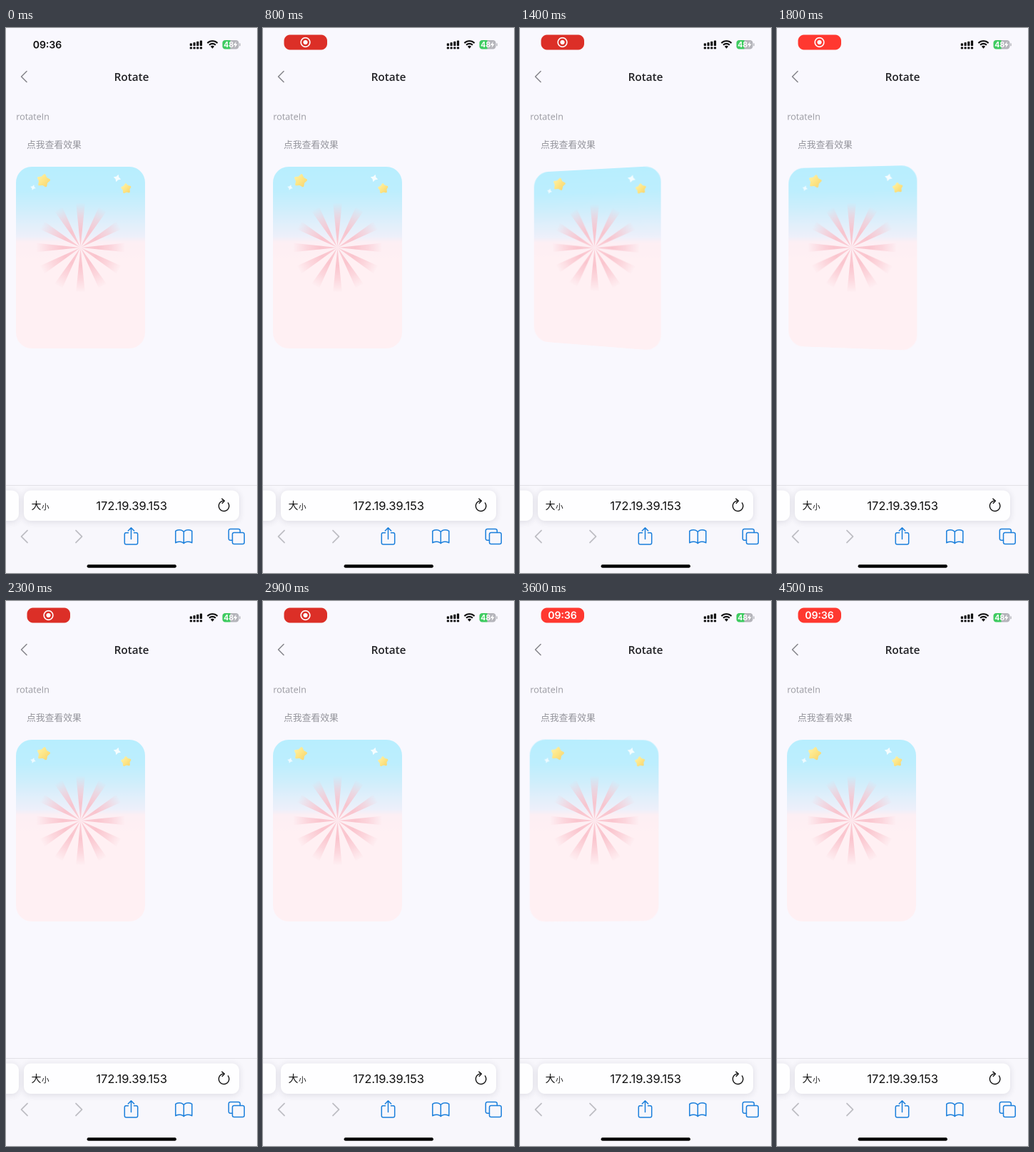
Recreate the animation shown at these times as an HTML page with a canvas. Size 352x762 px, loop 4700 ms.

```html
<!DOCTYPE html>
<html lang="zh">
<head>
<meta charset="utf-8">
<title>Rotate</title>
<style>
  html, body { margin: 0; width: 100%; height: 100%; overflow: hidden; background: #f9f8fe; }
  canvas { position: absolute; display: block; }
  #page { left: 0; top: 0; }
  #card { left: 14px; top: 194px; transform-origin: 90.5px 103px; }
</style>
</head>
<body>
<canvas id="page"></canvas>
<canvas id="card"></canvas>
<script>
const LOOP = 4700, TICK = 100, TURN = 1000, TAPS = [1020, 2930];
const BLUE = '#1a7fdc';
const UI = 'Inter, "Noto Sans CJK SC", sans-serif';
const TEXT = '"Open Sans", "Noto Sans", sans-serif';
const CJK = '"Noto Sans CJK SC", "Noto Sans CJK", sans-serif';

const cardEl = document.getElementById('card');
const page = setup(document.getElementById('page'), 352, 762);
const card = setup(cardEl, 181, 254);

function setup(el, w, h) {
  const k = Math.max(2, window.devicePixelRatio || 1);
  el.width = w * k;
  el.height = h * k;
  el.style.width = w + 'px';
  el.style.height = h + 'px';
  const c = el.getContext('2d');
  c.scale(k, k);
  return c;
}

function box(c, x, y, w, h, r, fill) {
  c.beginPath();
  c.roundRect(x, y, w, h, r);
  c.fillStyle = fill;
  c.fill();
}

function disc(c, x, y, r, fill) {
  c.beginPath();
  c.arc(x, y, r, 0, 7);
  c.fillStyle = fill;
  c.fill();
}

function line(d, color, width) {
  page.strokeStyle = color;
  page.lineWidth = width;
  page.lineCap = page.lineJoin = 'round';
  page.stroke(new Path2D(d));
}

function label(s, x, y, font, color, align = 'left') {
  page.font = font;
  page.fillStyle = color;
  page.textAlign = align;
  page.fillText(s, x, y);
}

// Easing
const clamp = v => Math.min(1, Math.max(0, v));
const mix = (a, b, t) => a + (b - a) * t;
const ramp = (t, a, b) => clamp((t - a) / (b - a));

function bezier(x1, y1, x2, y2) {
  const at = (a, b, u) => 3 * a * u * (1 - u) ** 2 + 3 * b * u * u * (1 - u) + u ** 3;
  return x => {
    let lo = 0, hi = 1;
    for (let i = 0; i < 24; i++) {
      const mid = (lo + hi) / 2;
      if (at(x1, x2, mid) < x) lo = mid; else hi = mid;
    }
    return at(y1, y2, lo);
  };
}
const easeIn = bezier(.42, 0, 1, 1), ease = bezier(.25, .1, .25, 1);

// Card artwork
function star(x, y, r, points, inner, tilt, fill, round) {
  card.beginPath();
  for (let i = 0; i < points * 2; i++) {
    const a = tilt - Math.PI / 2 + i * Math.PI / points, q = i % 2 ? r * inner : r;
    card.lineTo(x + q * Math.cos(a), y + q * Math.sin(a));
  }
  card.closePath();
  card.fillStyle = card.strokeStyle = fill;
  card.lineJoin = 'round';
  card.lineWidth = round;
  card.fill();
  if (round) card.stroke();
}

function goldStar(x, y, r, tilt) {
  const g = card.createLinearGradient(x - r, y - r, x + r, y + r);
  g.addColorStop(0, '#fff3a8');
  g.addColorStop(.55, '#fde483');
  g.addColorStop(1, '#f7d674');
  star(x, y, r, 5, .62, tilt, g, 3);
}

function drawCard() {
  const sky = card.createLinearGradient(0, 0, 0, 254);
  [[0, '#b8eefe'], [.13, '#bdeefe'], [.22, '#cdeefc'], [.31, '#e0effb'],
   [.385, '#eef0fa'], [.415, '#fdeff4'], [.5, '#fff0f3'], [1, '#fff0f3']]
    .forEach(([p, c]) => sky.addColorStop(p, c));
  box(card, 0, 0, 181, 254, 22, sky);

  const ray = card.createRadialGradient(90.5, 113, 0, 90.5, 113, 62);
  [[0, .35], [.12, .75], [.4, .85], [.7, .5], [1, .02]]
    .forEach(([p, a]) => ray.addColorStop(p, `rgba(250,190,200,${a})`));
  card.fillStyle = ray;
  for (let i = 0; i < 12; i++) {
    const a = i * Math.PI / 6;
    card.beginPath();
    card.moveTo(90.5, 113);
    for (const s of [-.1, .1]) card.lineTo(90.5 + 62 * Math.cos(a + s), 113 + 62 * Math.sin(a + s));
    card.fill();
  }

  goldStar(38.5, 19.5, 8, .2);
  goldStar(154.5, 30.5, 5.8, -.1);
  star(142, 16, 5.5, 4, .5, .3, 'rgba(255,255,255,.85)', 0);
  star(24, 29, 4, 4, .5, .3, 'rgba(255,255,255,.75)', 0);
}

// Damped flip around the vertical axis
const SWING = [[0, 90, easeIn], [.4, -20, easeIn], [.6, 10, ease], [.8, -5, ease], [1, 0]];

function angle(p) {
  for (let i = 0; i < 4; i++) {
    const [a, from, curve] = SWING[i], [b, to] = SWING[i + 1];
    if (p < b) return mix(from, to, curve((p - a) / (b - a)));
  }
  return 0;
}

function poseCard(t) {
  const tap = TAPS.find(s => t >= s && t < s + TURN);
  if (tap === undefined) {
    cardEl.style.transform = 'none';
    cardEl.style.opacity = 1;
    return;
  }
  const p = (t - tap) / TURN, deg = angle(p);
  const squash = p < .4 ? 1 - .34 * (deg + 20) / 110 : 1;
  cardEl.style.transform = `perspective(361px) rotateY(${deg}deg) translateY(24px) scaleY(${squash}) translateY(-24px)`;
  cardEl.style.opacity = Math.min(1, .6 + 1.4 * p);
}

// Status bar
function drawStatus(t) {
  const shown = ramp(t, 0, 400);
  const clock = ramp(t, 3100, 3300);
  const icon = ramp(t, 300, 800) * (1 - clock);
  const glow = ramp(t, 1400, 1700) * (1 - ramp(t, 1900, 2100)) + ramp(t, 3300, 3600);
  const font = '600 14px ' + UI;

  page.globalAlpha = 1 - shown;
  label('09:36', 58, 28.5, font, '#111', 'center');
  page.globalAlpha = shown;
  box(page, 29.5, 9.5, 60.5, 21, 8.5,
    `rgb(${mix(220, 255, glow)},${mix(47, 56, glow)},${mix(39, 48, glow)})`);
  page.globalAlpha = icon;
  page.strokeStyle = '#fff';
  page.lineWidth = 1.6;
  page.beginPath();
  page.arc(59.5, 20, 6.3, 0, 7);
  page.stroke();
  disc(page, 59.5, 20, 3.1, '#fff');
  page.globalAlpha = clock;
  label('09:36', 59.5, 25, font, '#fff', 'center');
  page.globalAlpha = 1;

  for (let i = 0; i < 4; i++) {
    const x = 257.8 + i * 4.7, h = 3.6 + i * 1.3;
    box(page, x, 25 - h, 3.2, h, .8, '#111');
    box(page, x, 26.4, 3.2, 3, .8, '#111');
  }

  page.lineCap = 'butt';
  page.strokeStyle = '#111';
  page.lineWidth = 2.1;
  for (const r of [10, 6.3]) {
    page.beginPath();
    page.arc(289.5, 28.2, r, -Math.PI * .75, -Math.PI * .25);
    page.stroke();
  }
  page.fillStyle = '#111';
  page.fill(new Path2D('M286.9 25.7Q289.5 23.6 292.1 25.7L289.5 28.8Z'));

  page.save();
  page.beginPath();
  page.roundRect(303.5, 17, 23, 12.5, 4);
  page.clip();
  page.fillStyle = '#b4b4ba';
  page.fillRect(303, 16, 24, 14);
  page.fillStyle = '#3ecb60';
  page.fillRect(303, 16, 11.5, 14);
  page.restore();
  box(page, 327.3, 21.3, 1.4, 4, .7, '#b4b4ba');
  label('48', 305.3, 27.2, '700 10.5px ' + UI, '#fff');
  page.fillStyle = '#fff';
  page.fill(new Path2D('M322.8 18.8L318.8 24H321.4L320.6 27.8L324.6 22.4H322Z'));
}

function drawBrowser() {
  page.fillStyle = '#f8f7fc';
  page.fillRect(0, 639, 352, 123);
  page.fillStyle = '#e2e1e7';
  page.fillRect(0, 639, 352, 1);

  page.save();
  page.shadowColor = 'rgba(40,40,60,.13)';
  page.shadowBlur = 18;
  page.shadowOffsetY = 3;
  box(page, -40, 646.5, 58, 42.5, 10, '#fefeff');
  box(page, 25, 646.5, 302, 42.5, 10, '#fefeff');
  page.restore();

  label('大', 35.5, 673, '500 14px ' + CJK, '#111');
  label('小', 50, 673, '500 10.5px ' + CJK, '#111');
  label('172.19.39.153', 176.2, 673.8, '400 16.4px ' + UI, '#111', 'center');

  line('M304.2 661.2A7.2 7.2 0 1 0 311.4 664', '#111', 1.4);
  line('M302.8 658.2L306.4 661.2L303.2 664.5', '#111', 1.4);

  line('M30 702.5L21.5 711L30 719.5M98 702.5L106.5 711L98 719.5', '#bdbdc3', 1.7);
  line('M171.5 705.8H168.5Q166.3 705.8 166.3 708V719.5Q166.3 722 168.7 722H182.3Q184.7 722 184.7 719.5V708' +
    'Q184.7 705.8 182.5 705.8H179.5M175.5 714.5V699M171.3 703L175.5 698.8L179.7 703', BLUE, 1.5);
  line('M249.3 704.5Q247 701.7 243.2 701.7Q240 701.7 237.8 703.3V719.7Q240 718.3 243.2 718.3Q247 718.3 249.3 720.6' +
    'Q251.6 718.3 255.4 718.3Q258.6 718.3 260.8 719.7V703.3Q258.6 701.7 255.4 701.7Q251.6 701.7 249.3 704.5V720.6', BLUE, 1.5);
  line('M317.5 716.2H314.8Q312.3 716.2 312.3 713.7V703Q312.3 700.5 314.8 700.5H325.8Q328.3 700.5 328.3 703V705.5', BLUE, 1.5);
  line('M320 705.5H331.7Q334.2 705.5 334.2 708V719Q334.2 721.5 331.7 721.5H320Q317.5 721.5 317.5 719V708Q317.5 705.5 320 705.5Z', BLUE, 1.5);

  box(page, 113.5, 750.3, 125.5, 4.4, 2.2, '#050505');
}

function draw(t) {
  page.fillStyle = '#f9f8fe';
  page.fillRect(0, 0, 352, 762);
  drawStatus(t);
  line('M29 60.5L21.5 68L29 75.5', '#85858b', 1.5);
  label('Rotate', 176, 74, '600 15.3px ' + TEXT, '#222226', 'center');
  label('rotateIn', 14.2, 128.3, '400 12.6px ' + TEXT, '#9a9aa1');
  label('点我查看效果', 29, 168.2, '400 12.8px ' + CJK, '#94949b');
  drawBrowser();
  poseCard(t);
}

drawCard();
const start = performance.now();
function frame() {
  const t = (performance.now() - start) % LOOP;
  draw(Math.floor(t / TICK) * TICK);
  requestAnimationFrame(frame);
}
frame();
</script>
</body>
</html>
```
